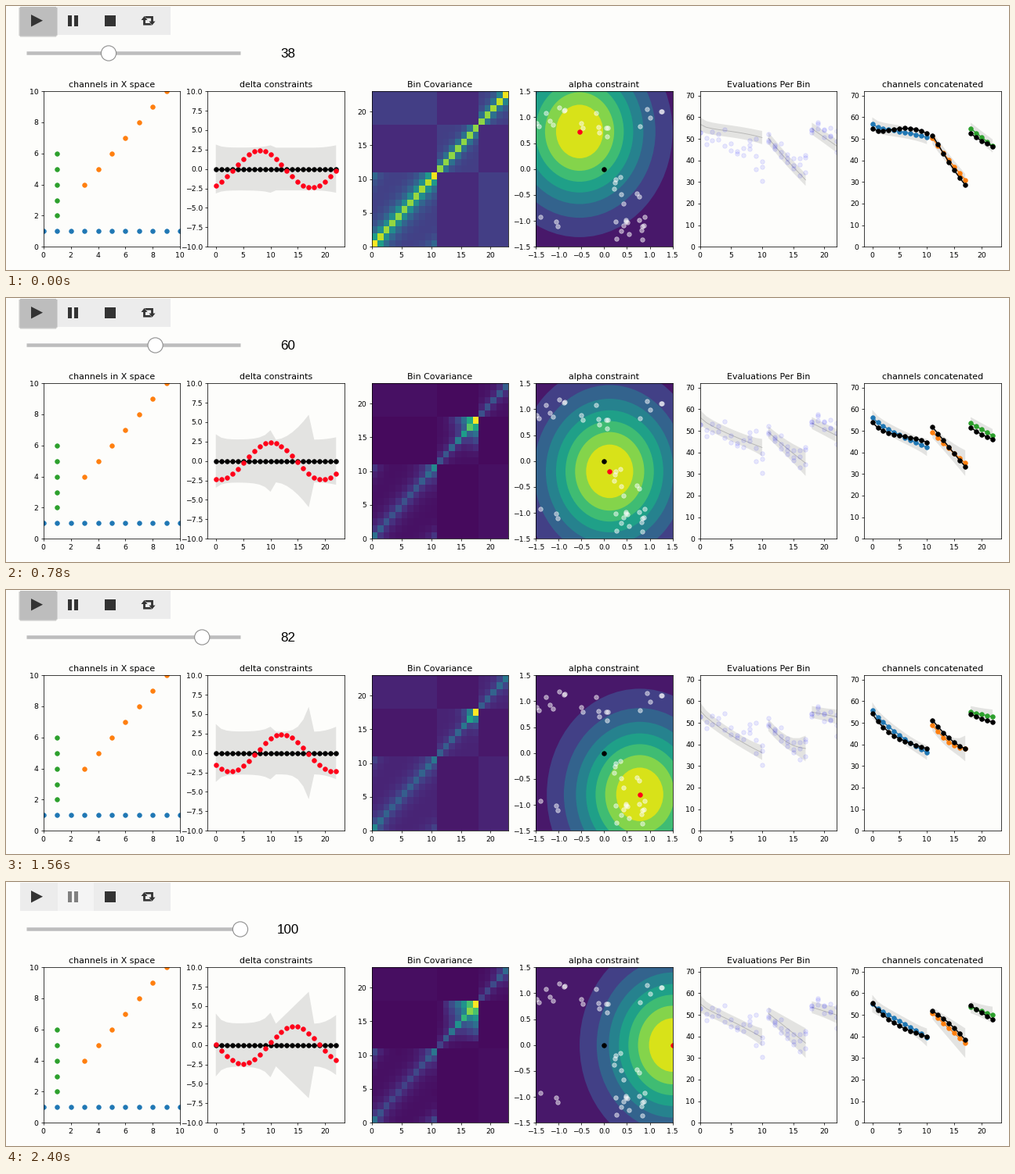
These frames come from a looping animation (1280 by 338 pixels, 2.43 s). A matplotlib script:

```python
import numpy as np
import matplotlib.pyplot as plt
from matplotlib.animation import FuncAnimation
from matplotlib.patches import Circle, Polygon, Rectangle

W, H, DPI = 1280, 338, 72
FRAMES, STEP_MS = 81, 30
STOPPED = 74
PAPER, DARK, RED = "#fdfdfb", "#333333", "#ff0019"
BLUE, ORANGE, GREEN = COLORS = "#1f77b4", "#ff7f0e", "#2ca02c"

rng = np.random.default_rng(4)
bins = np.arange(23)
channels = [bins[:11], bins[11:18], bins[18:]]


# Model: everything follows from the plot parameter p
def even(x):
    return 2 * int(round(x / 2))


def slider_at(frame):
    return even(min(100, 38 + .86 * frame))


def param_at(frame):
    return even(32 + .86 * frame)


def ramp(p, start, end):
    return np.clip((p - start) / (end - start), 0, 1)


def alpha_at(p):
    x = -1.5 + .03 * p
    return x, -.8 * np.sin(2 * np.pi * x / 3)


def delta_at(p):
    peak = 8 + .093 * (p - 32)
    return 2.4 * np.cos(2 * np.pi * (bins - peak) / 19)


def width_at(p):
    q = max(0, -alpha_at(p)[1] / .8)
    blue, orange, green = channels
    half = np.full(23, 2.75)
    half[blue] += (.4 + .9 * ramp(p, 32, 100)) * np.exp(-blue)
    half[blue] += (.3 + 1.1 * ramp(p, 32, 48) * (1 - .7 * q)) * np.exp((blue - 10) / 1.4)
    peak = 3.2 * ramp(p, 32, 48) + .9 * ramp(p, 84, 96)
    half[orange] += peak * ((orange - 11) / 6) ** (1 + 3 * q)
    half[green] += (.3 + .8 * ramp(p, 60, 100)) * ((green - 18) / 4) ** 2
    return half


def mean_at(p):
    q = -alpha_at(p)[1] / .8
    t = (p - 32) / 68
    u, v, w = [(ch - ch[0]) / (ch[-1] - ch[0]) for ch in channels]
    blue = 56.8 - 1.6 * t - 11.2 * u ** .7 - 5.5 * q * np.sin(np.pi * u / 2) - 4.5 * t * u ** 2
    orange = (49.2 - 16 * v + q * (3.7 * v ** 2 - 1.2)
              - 1.6 * q ** 2 * np.sin(np.pi * v) + t * (1.5 + 2.2 * v))
    green = 53.5 - 7.6 * w + 1.6 * q * w + q ** 2 * (1.5 + 1.2 * w) + 4 * t * w
    return np.concatenate([blue, orange, green])


def covariance(p):
    var = width_at(p) ** 2
    cov = np.zeros((23, 23))
    for ch, reach in zip(channels, (1.3, .8, .8)):
        base = var[ch].min()
        extra = var[ch] - base
        dist = abs(ch[:, None] - ch)
        cov[np.ix_(ch, ch)] = (base * np.exp(-dist / reach)
                               + np.outer(extra, extra) / (extra.max() + 1e-9))
    np.fill_diagonal(cov, var)
    q = alpha_at(p)[1] / .8
    low = .03 + .05 * q ** 2 + .08 * (1 - ramp(p, 32, 48))
    sign = np.where((bins > 10) & (bins < 18), -1, 1)
    return low * (1 + .2 * np.outer(sign, sign)) + (1 - low) * cov / cov.max()


def outline(x, mid, half):
    return np.column_stack([np.r_[x, x[::-1]],
                            np.r_[mid + half, (mid - half)[::-1]]])


plt.rcParams.update({
    "font.family": "DejaVu Sans", "font.size": 9.2, "axes.titlesize": 11,
    "axes.titlepad": 5.5, "axes.linewidth": .75,
    "lines.linewidth": 1.4, "lines.markersize": 5.5, "lines.markeredgewidth": .9})
for axis in ("xtick", "ytick"):
    plt.rcParams.update({f"{axis}.major.size": 3.2, f"{axis}.major.pad": 3.2,
                         f"{axis}.major.width": .75})
fig = plt.figure(figsize=(W / DPI, H / DPI), dpi=DPI, facecolor=PAPER)


# Player controls, in pixel coordinates
ui = fig.add_axes([0, 0, 1, 1])
ui.set(xlim=(0, W), ylim=(H, 0))
ui.axis("off")


def box(x, y, w, h, color=DARK, **kw):
    return ui.add_patch(Rectangle((x, y), w, h, fc=color, ec="none", **kw))


def shape(points):
    return ui.add_patch(Polygon(points, fc=DARK, ec="none"))


box(18, 1, 192, 36, "#ececec")
pressed = [box(18 - k, 2, 46 + 2 * k, 38 - k, "k", alpha=.1) for k in range(3)]
pressed.append(box(18, 1, 46, 37, "#bdbdbd"))
focus = box(66, 1, 46, 36, "#f4f4f4")
shape([(32, 11), (47, 18.7), (32, 26.5)])
pause = [box(x, 12, 5.4, 13.5) for x in (78.5, 86.8)]
box(126, 12, 14, 13.5)
arrow = np.array([(176.5, 13), (180.5, 18), (177.9, 18), (177.9, 22), (184, 22),
                  (186, 24.6), (175.1, 24.6), (175.1, 18), (172.5, 18)])
shape(arrow)
shape(np.array([363, 37.6]) - arrow)

ui.plot([26, 299], [60.3, 60.3], color="#bdbdbd", lw=4.5, solid_capstyle="butt")
thumb = ui.add_patch(Circle((0, 60.5), 9.6, fc="white", ec="#8e8e8e", lw=1.1, zorder=3))
value = ui.text(359.5, 66, "", family="Liberation Sans", size=17, ha="center")


# Charts
def panel(k, title, xlim, ylim, xticks, yticks):
    ax = fig.add_axes([(47.8 + 209.45 * k) / W, (H - 308.2) / H, 174.5 / W, 199 / H],
                      facecolor=PAPER)
    ax.set(xlim=xlim, ylim=ylim, xticks=xticks, yticks=yticks, title=title)
    return ax


def dots(ax, x, y, color, **kw):
    return ax.plot(x, y, "o", color=color, **kw)[0]


def band(ax):
    return ax.add_patch(Polygon([(0, 0), (0, 1)], fc="k", ec="none", alpha=.1, zorder=1))


twos, fives, tens = range(0, 11, 2), range(0, 21, 5), range(0, 71, 10)
halves = np.arange(-1.5, 1.6, .5)
wide = (-1.5, 23.5)

ax = panel(0, "channels in X space", (0, 10), (0, 10), twos, twos)
dots(ax, range(11), [1] * 11, BLUE)
dots(ax, range(3, 10), range(4, 11), ORANGE)
dots(ax, [1] * 5, range(2, 7), GREEN)

ax = panel(1, "delta constraints", wide, (-10, 10), fives, np.arange(-10, 10.1, 2.5))
delta_band = band(ax)
ax.plot(bins, 0 * bins, "ko-")
red_dots = dots(ax, bins, 0 * bins, RED)

ax = panel(2, "Bin Covariance", (0, 23), (0, 23), fives, fives)
edges = np.arange(24)
heat = ax.pcolormesh(edges, edges, np.zeros((23, 23)), cmap="viridis", vmin=0, vmax=1)

ax = panel(3, "alpha constraint", (-1.5, 1.5), (-1.5, 1.5), halves, halves)
viridis = plt.get_cmap("viridis")
ax.set_facecolor(viridis(1 / 16))
rings = [ax.add_patch(Circle((0, 0), np.sqrt(-2 * np.log(k / 8)), ec="none",
                             fc=viridis((k + .5) / 8), zorder=1))
         for k in range(1, 8)]
for x, y, count in [(-1.2, .9, 8), (-.25, .8, 8), (.95, 1, 5),
                    (.45, -.4, 8), (.55, -1.1, 14), (-1.1, -.85, 3)]:
    cloud = rng.uniform(-1, 1, (2, count))
    dots(ax, x + .35 * cloud[0], y + .3 * cloud[1], "w", alpha=.5)
alpha_dot = dots(ax, [0], [0], RED)
dots(ax, [0], [0], "k")

ax = panel(4, "Evaluations Per Bin", (0, 22), (0, 72), fives, tens)
eval_bands = [band(ax) for _ in channels]
eval_lines = [ax.plot([], [], color="k", alpha=.2, lw=.9)[0] for _ in channels]
for b in np.r_[bins, bins, bins[8:]]:
    y = mean_at(rng.uniform(32, 100))[b] + rng.normal(0, 2)
    dots(ax, [b], [y], "b", alpha=.09)

ax = panel(5, "channels concatenated", wide, (0, 72), fives, tens)
cat_bands = [band(ax) for _ in channels]
mean_lines = [ax.plot([], [], "o-", color=c)[0] for c in COLORS]
sum_lines = [ax.plot([], [], "ko-")[0] for _ in channels]


def update(frame):
    v, p = slider_at(frame), param_at(frame)
    thumb.center = 28 + 2.71 * v, 60.5
    value.set_text(str(v))

    stopped = frame >= STOPPED
    for patch in pressed:
        patch.set_visible(not stopped)
    focus.set_visible(stopped)
    for bar in pause:
        bar.set_facecolor("#808080" if stopped else DARK)

    delta, half, mean = delta_at(p), width_at(p), mean_at(p)
    delta_band.set_xy(outline(bins, 0 * half, half))
    red_dots.set_ydata(delta)
    heat.set_array(covariance(p))

    center = alpha_at(p)
    for ring in rings:
        ring.center = center
    alpha_dot.set_data([center[0]], [center[1]])

    for k, ch in enumerate(channels):
        xy = outline(ch, mean[ch], half[ch])
        eval_bands[k].set_xy(xy)
        cat_bands[k].set_xy(xy)
        eval_lines[k].set_data(ch, mean[ch])
        mean_lines[k].set_data(ch, mean[ch])
        sum_lines[k].set_data(ch, mean[ch] + delta[ch])
    return []


anim = FuncAnimation(fig, update, frames=FRAMES, interval=STEP_MS,
                     repeat=True, repeat_delay=0, blit=False)
plt.show()
```
